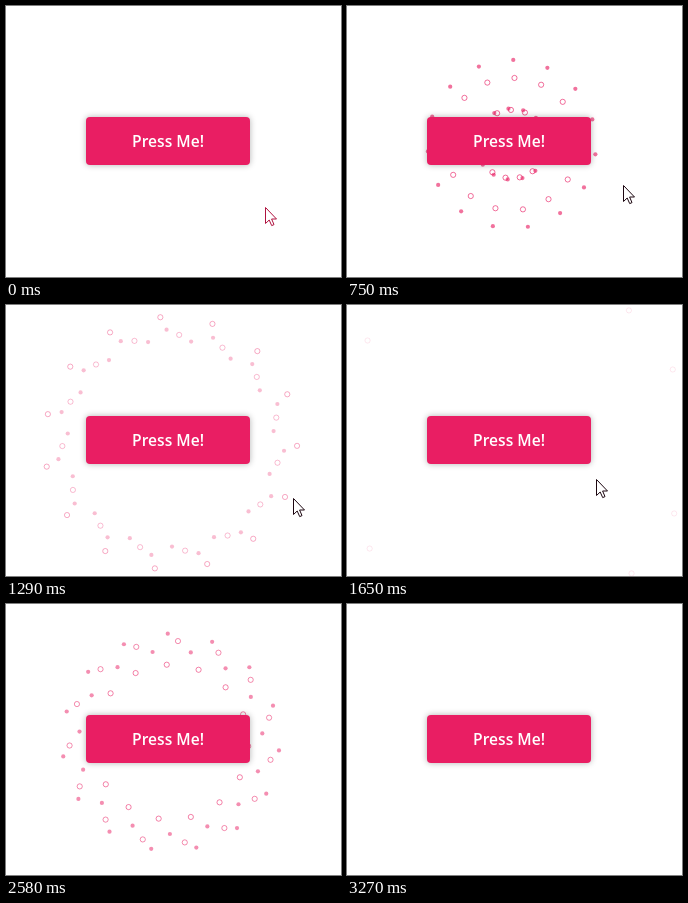
Animation of 335x271 px, one loop 3420 ms. Source, as an HTML page with a canvas:

```html
<!DOCTYPE html>
<html lang="en">
<head>
<meta charset="utf-8">
<title>Burst button</title>
<style>
  html, body { margin: 0; width: 100%; height: 100%; overflow: hidden; background: #fff; }
  #stage { position: relative; width: 335px; height: 271px; overflow: hidden; }
  canvas, svg { position: absolute; left: 0; top: 0; }
  #button {
    position: absolute; left: 80px; top: 111px; width: 164px; height: 48px;
    border-radius: 4px; color: #fff; text-align: center;
    font: 600 15.6px/48px "Open Sans", "Noto Sans", sans-serif;
  }
  path { stroke-width: 1; stroke-linejoin: round; }
</style>
</head>
<body>
<div id="stage">
  <canvas id="burst" width="335" height="271"></canvas>
  <div id="button">Press Me!</div>
  <svg width="335" height="271">
    <g id="pointer" fill="#fff">
      <path id="arrow" d="M.5 .5V16.5L4.2 13L6.7 18.6L9 17.6L6.6 12H11.5Z"/>
      <g id="hand" transform="translate(-8.4 -.8)">
        <path d="M6.6 15V3a1.75 1.75 0 0 1 3.5 0V9.5a1.6 1.6 0 0 1 3 .2a1.5 1.5 0 0 1 2.8 .7a1.4 1.4 0 0 1 2.5 1V17q0 3-2 5V24.5H8V23Q5.5 20.5 4 17.5L2 14.3Q1 12 3 12.2Q4.5 12.8 6.6 15Z"/>
        <path fill="none" d="M10.1 9.5V13M13.1 10V13M15.9 10.7V13.5"/>
      </g>
    </g>
  </svg>
</div>
<script>
const LOOP = 3420, AGAIN = 1590, BURST_END = 1670, SETTLE = 1160;
const CENTER = { x: 164.8, y: 138.1 }, COUNT = 15;

// Three rings start in turn and settle together; a slower one flies off the stage.
const staggered = (i, angle, turn) => {
  const start = 355 + 150 * i;
  return { start, life: SETTLE - start, reach: 113.5 - 5 * i, angle, turn, gone: 1620, dot: i !== 1 };
};
const RINGS = [
  staggered(0, 16, -.107),
  staggered(1, 5, .05),
  staggered(2, 4.4, -.107),
  { start: 575, life: 3030, reach: 303, angle: 5.8, turn: -.036, gone: 1765 }
];

const REST = [236, 151];
const PATH = [
  { t: 0, at: [259, 201] },
  { t: 365, at: REST }, { t: 480, at: REST },
  { t: 1020, at: [315, 207] },
  { t: 1650, at: [249, 174] },
  { t: 1900, at: REST }, { t: 2040, at: REST },
  { t: 2420, at: [314, 271] }
];

const $ = id => document.getElementById(id);
const ctx = $('burst').getContext('2d');
const mix = (a, b, k) => a + (b - a) * k;
const clamp = k => Math.max(0, Math.min(1, k));
const easeOut = k => 1 - (1 - clamp(k)) ** 2;
const pulse = (t, on, off, ramp) => clamp(Math.min(t - on, off - t) / ramp);

function drawRing({ start, life, reach, angle, turn, gone, dot }, t) {
  if (t < start || t > Math.min(gone, BURST_END)) return;
  const radius = reach * easeOut((t - start) / life);
  ctx.globalAlpha = .8 * (1 - (t / gone) ** 2);
  for (let i = 0; i < COUNT; i++) {
    const a = (angle + turn * radius + i * 360 / COUNT) * Math.PI / 180;
    ctx.beginPath();
    ctx.arc(CENTER.x + radius * Math.cos(a), CENTER.y + radius * Math.sin(a), dot ? 2.1 : 2.6, 0, 7);
    if (dot) ctx.fill(); else ctx.stroke();
  }
}

function drawButton(t) {
  const h = pulse(t, 250, 740, 170) + pulse(t, 1760, 2280, 170);
  const { style } = $('button');
  style.background = `rgb(${mix(233, 255, h)} ${mix(30, 81, h)} ${mix(99, 137, h)})`;
  style.boxShadow = `0 0 ${mix(6, 20, h)}px rgba(0,0,0,${mix(.3, .4, h)})`;
}

function drawPointer(t) {
  const next = PATH.findIndex(p => p.t > t);
  const b = PATH[next] || PATH[PATH.length - 1], a = next > 0 ? PATH[next - 1] : b;
  const k = a === b ? 0 : (t - a.t) / (b.t - a.t);
  const [x, y] = a.at.map((v, n) => Math.round(mix(v, b.at[n], k)));
  const over = x < 244 && y < 159;
  $('pointer').setAttribute('transform', `translate(${x} ${y})`);
  $('pointer').setAttribute('stroke', t < 40 ? '#b0123f' : '#1c0610');
  $('arrow').style.display = over ? 'none' : '';
  $('hand').style.display = over ? '' : 'none';
}

function frame() {
  const t = performance.now() % LOOP;
  ctx.clearRect(0, 0, 335, 271);
  ctx.fillStyle = ctx.strokeStyle = '#e91e63';
  ctx.lineWidth = 1;
  for (const ring of RINGS) {
    drawRing(ring, t);
    drawRing(ring, t - AGAIN);
  }
  drawButton(t);
  drawPointer(t);
  requestAnimationFrame(frame);
}
frame();
</script>
</body>
</html>
```
